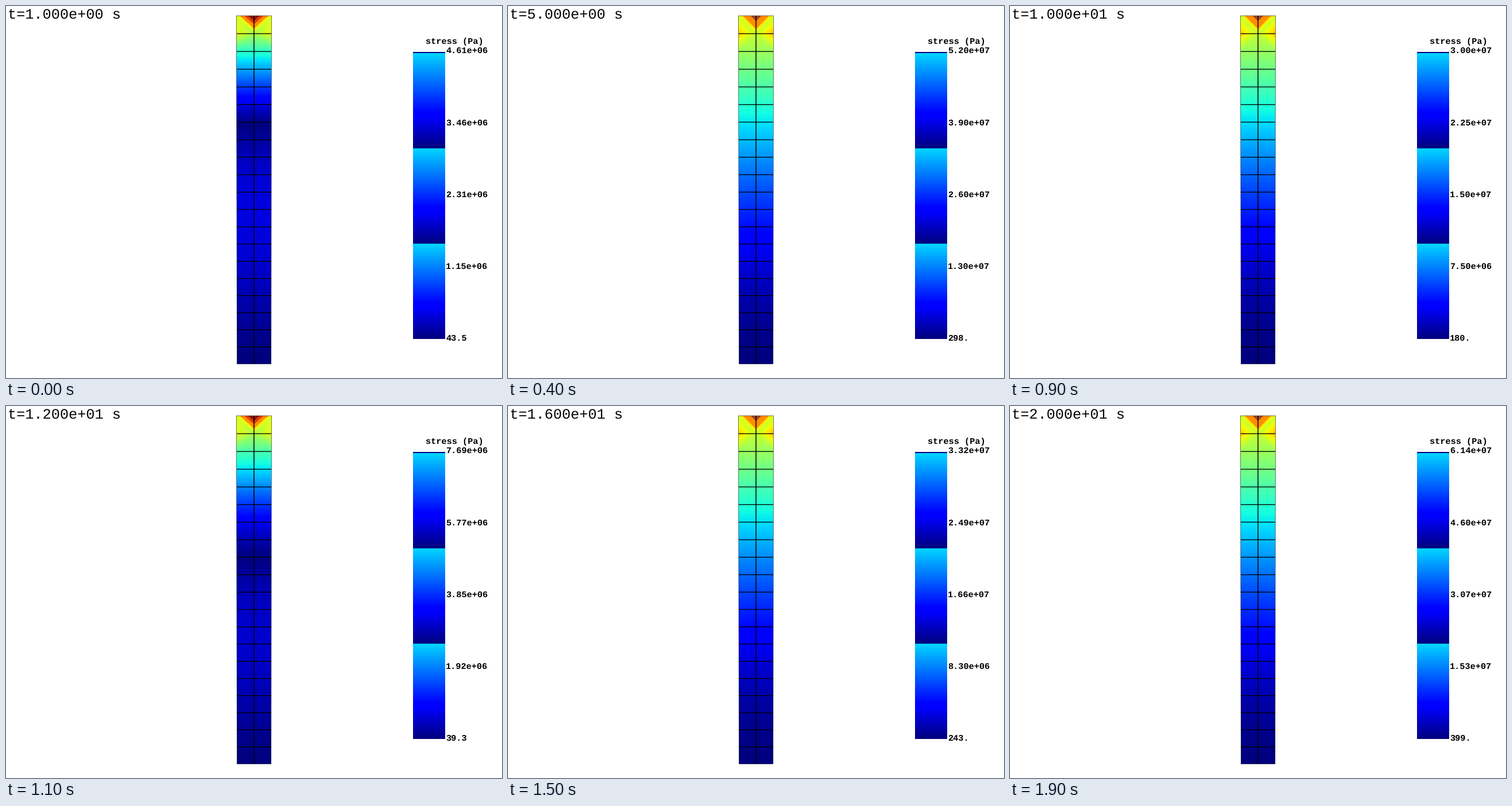
Animation, 864 px wide and 648 px high, one loop 2000 ms. Source, as a matplotlib script:

```python
import numpy as np
import matplotlib.pyplot as plt
from matplotlib.animation import FuncAnimation
from matplotlib.patches import Polygon

W, H, STEPS = 864, 648, 20
ROWS = 20
LEFT, RIGHT, TOP, BOTTOM, MID = 401, 463, 17, 624, 432
PERIOD = 12.8

# second: (largest stress in MPa, smallest in Pa)
KEYS = {1: (4.61, 43.5), 3: (24.8, 96.1), 7: (62.63, 499), 10: (30, 180),
        12: (7.692, 39.3), 16: (33.2, 243), 20: (61.36, 399)}

YELLOW, ORANGE, BROWN = (255, 228, 0), (255, 142, 0), (163, 70, 36)
RED, DARK_RED = (224, 62, 10), (152, 18, 0)

plt.rcParams["text.hinting"] = "none"
plt.rcParams["font.family"] = "Liberation Mono"
jet = plt.get_cmap("jet", 1024)


def swing(t):
    return 2 + 62 * np.sin(np.pi * t / PERIOD) ** 2


def stress_range(t):
    """Swinging load, corrected smoothly between the key seconds."""
    ratios = [high / swing(k) for k, (high, _) in KEYS.items()]
    lows = [low for _, low in KEYS.values()]
    times = list(KEYS)
    return swing(t) * np.interp(t, times, ratios), np.interp(t, times, lows)


def is_reversed(load):
    return load < 12


def profile(s, load):
    """Relative stress along the beam, s = 0 at the top and 1 at the end."""
    if not is_reversed(load):
        return .645 * (1 - s) ** (1.67 + .7 * np.exp(-load / 15))
    # Weak load: the bending changes sign part of the way down
    zero = .166 + .0312 * load
    near = .645 * np.clip(1 - s / zero, 0, 1) ** (1 + .045 * load)
    w = np.clip((s - zero) / (1 - zero), 0, 1)
    return near + (.11 - .0055 * load) * w * (1 - w) ** 1.7 / .169


def bands(load):
    if is_reversed(load):
        return [(.69, ORANGE), (.79, RED), (.87, DARK_RED)]
    if load < 28:
        return [(.67, YELLOW), (.81, BROWN)]
    return [(.70, ORANGE), (.87, BROWN)]


def row_y(i):
    return TOP + 31.1 * i - 0.04 * i ** 2


ys, xs = np.mgrid[TOP:BOTTOM, LEFT:RIGHT] + 0.5
u = np.clip(abs(xs - MID) / 30, 0, 1)
r = np.interp(ys, row_y(np.arange(ROWS + 1)), np.arange(ROWS + 1))


def beam_image(load):
    weak = is_reversed(load)
    v = profile(r / ROWS, load)
    below = float(profile(1 / ROWS, load))
    inner = max(below, .56)
    corner = .62 if weak else .60
    gain = .07 if weak else np.where(xs > MID, .115, .10)
    # First row: two linear triangles per cell, second row: fading corner
    upper = 1 - u - r + corner * u + inner * r
    lower = (corner * (1 - r) + inner * (1 - u)
             + (inner + gain) * (u + r - 1))
    fade = (inner - below) * (2 - r) + gain * np.clip(u - r + 1, 0, 1)
    v = np.where(r < 2, v + fade, v)
    v = np.where(r < 1, np.where(u + r < 1, upper, lower), v)
    rgb = jet(v)[..., :3]
    for level, color in bands(load):
        rgb[v >= level] = np.array(color) / 255
    return rgb


fig = plt.figure(figsize=(12, 9), dpi=72, facecolor="white")
ax = fig.add_axes([0, 0, 1, 1])
ax.axis("off")


def picture(rgb, left, right, top, bottom):
    return ax.imshow(rgb, extent=(left, right, bottom, top),
                     interpolation="nearest", aspect="auto")


def line(x, y, width):
    ax.plot(x, y, color="black", lw=width, solid_capstyle="butt",
            snap=False, zorder=3)


def label(x, y, size, text="", weight="normal"):
    return ax.text(x, y, text, fontsize=size, weight=weight, color="black",
                   ha="left", va="baseline")


# Beam with its mesh
beam = picture(beam_image(5), LEFT, RIGHT, TOP, BOTTOM)
outline = Polygon([(401.5, 17), (462.4, 17), (461.8, 623.5), (402.4, 623.5)],
                  closed=True, fill=False, ec="black", lw=.7, alpha=.75,
                  zorder=3)
ax.add_patch(outline)
beam.set_clip_path(outline)
for i in range(1, ROWS):
    line([402, 462], [row_y(i) + .2] * 2, 1.3)
line([MID, MID], [TOP, BOTTOM - 1], 1.5)

# Colour bar: the same ramp three times
ramp = jet((1 - (np.arange(498) % 166) / 165) / 3)[:, None, :3]
picture(ramp, 709, 765, 82, 580)
ax.fill_between([709, 765], 80, 82, color=jet(0), lw=0)

ax.set_xlim(0, W)
ax.set_ylim(H, 0)

clock = label(3, 22, 25.2)
label(731, 65.7, 15.2, "stress (Pa)", "bold")
marks = [label(766, 82.2 + 125.2 * k, 15.2, weight="bold") for k in range(5)]


def draw(frame):
    t = frame + 1
    load, low = stress_range(t)
    clock.set_text(f"t={t:.3e} s")
    for k, mark in enumerate(marks):
        value = load * 1e6 * (1 - k / 4) + low * k / 4
        mark.set_text(f"{value:#.3g}")
    beam.set_data(beam_image(load))
    return [clock, beam, *marks]


anim = FuncAnimation(fig, draw, frames=STEPS, interval=100, repeat=True,
                     repeat_delay=0, blit=False)
plt.show()
```
